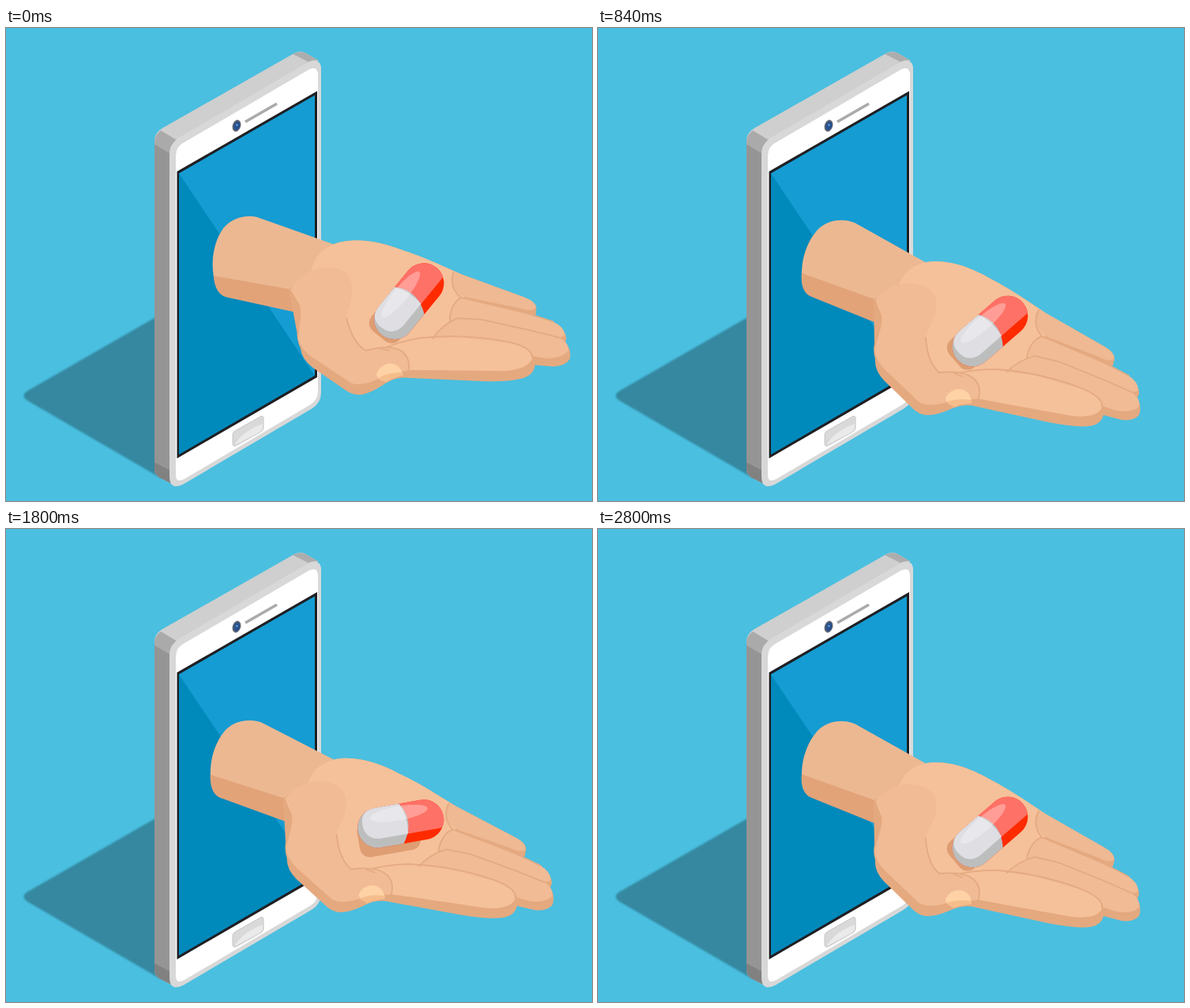
Write an HTML page that moves like this. It is 742 px wide and 600 px high and loops after 3 s.

```html
<!DOCTYPE html>
<html lang="en">
<head>
<meta charset="utf-8">
<title>Hand with capsule</title>
<style>
  html, body { margin: 0; width: 100%; height: 100%; overflow: hidden; background: #4abfe0; }
  svg { display: block; width: 742px; height: 600px; }
  .line { fill: none; stroke: #e4aa82; stroke-width: 1.8; stroke-linecap: round; }
  .skin { fill: #f5c19a; }
  .tone { fill: #f0bb95; }
  .dark { fill: #e5a97f; }
</style>
</head>
<body>
<svg viewBox="0 0 742 600">
  <defs>
    <clipPath id="pillClip"><rect x="-55" y="-25.5" width="110" height="51" rx="25.5"/></clipPath>
    <filter id="soft"><feGaussianBlur stdDeviation="1"/></filter>
  </defs>
  <rect width="742" height="600" fill="#4abfe0"/>
  <path d="M198 362 L26 461 Q19 466 26 472 L198 572Z" fill="#3488a0" filter="url(#soft)"/>

  <g id="phone">
    <path d="M188 143 Q188 133 198 127 L365 32 Q373 28 380 32 L395 41 L300 300 L215 581 L196 571 Q188 567 188 560Z" fill="#cfcfcf"/>
    <path d="M188 147 L207 158 V577 L196 571 Q188 567 188 560Z" fill="#959595"/>
    <path d="M188 147 Q187 137 196 130 L216 142 Q207 149 207 159Z" fill="#aaa"/>
    <path d="M188 551 L207 561 Q207 574 214 580 L196 571 Q188 567 188 560Z" fill="#818181"/>
    <path d="M363 33 Q373 28 380 32 L397 42 Q390 39 383 43Z" fill="#adadad"/>
    <path d="M207 161 Q207 147 219 139 L380 45 Q399 36 399 52 V462 Q399 476 387 483 L224 579 Q207 587 207 568Z" fill="#d8d8d8"/>
    <path d="M215 163 Q215 151 224 146 L383 53 Q395 47 395 60 V460 Q395 472 385 478 L226 572 Q215 578 215 567Z" fill="#fff"/>
    <path d="M216.5 182 L394 80 V443 L216.5 546Z" fill="#1f1f23"/>
    <path d="M219 184.5 L391 85.5 V441 L219 541Z" fill="#0089bb"/>
    <path d="M219 184.5 L391 85.5 V441Z" fill="#159cd2"/>
    <path d="M303 119 L343 96" stroke="#aaa" stroke-width="3.6"/>
    <g transform="rotate(18 292 124)">
      <ellipse cx="292" cy="124" rx="5.2" ry="7.6" fill="#5e6472"/>
      <ellipse cx="292.3" cy="124" rx="3.7" ry="5.6" fill="#25508f"/>
      <circle cx="292" cy="123" r="1.3" fill="#6f9ad0"/>
    </g>
    <path d="M290 511 L322 493 Q326 491 326 495 V507 Q326 510 323 512 L291 530 Q287 531 287 527 V516 Q287 513 290 511Z" fill="#d9d9d9" stroke="#c6c6c6"/>
    <path d="M290 529 Q297 513 325 502 V507 Q325 510 322 512Z" fill="#eaeaea"/>
  </g>

  <g id="hand">
    <path d="M258 309 L352 343 V374 L273 342 Q255 337 258 309Z" fill="#e2a379"/>
    <path d="M258 311 C258 286 269 264 281 253 C293 243 311 241 325 247 L416 298 L400 360 L350 344Z" fill="#ecb892"/>
    <path class="dark" d="M380 328 C388 306 402 298 424 296 C452 295 478 307 497 318 Q518 329 536 341 L566 361 L641 404 Q655 412 654 420 L652 428 Q648 431 644 430
      L677 447 Q686 456 685 464 L683 469 Q689 480 685 491 Q678 499 663 497 L640 491 Q637 503 622 505 Q605 507 570 500
      L474 479 Q462 477 450 482 Q428 492 416 491 Q406 490 399 483 L362 447 Q350 434 351 420 Q348 410 350 400 L349 344Z"/>
    <path class="skin" d="M352 346 Q366 337 380 328 C388 306 402 298 424 296 C452 295 478 307 497 318 Q518 329 536 341 L566 361 L566 395 L600 430
      L628 464 Q642 474 637 484 Q628 495 600 492 L480 470 L430 465 L380 420Z"/>
    <path class="tone" d="M518 436 L545 417 L575 423 L640 446 L676 462 Q687 470 685 480 Q676 489 655 485 L640 480 Q638 470 615 459 L550 440Z"/>
    <path class="tone" d="M543 418 Q548 396 562 391 L642 426 L672 441 Q684 449 684 459 Q680 464 668 459 L580 424Z"/>
    <path d="M554 368 Q554 359 559 357 L566 361 L641 404 Q655 412 653 420 Q646 424 634 417 L577 395 Q553 387 554 368Z" fill="#eeb993"/>
    <path class="line" d="M558 358 Q549 376 562 391 L642 425 L672 441 M562 391 Q547 397 543 418 M518 436 Q533 421 553 416 L583 423 L640 446 L676 462
      M444 440 Q480 432 505 433 Q560 437 610 456 Q640 468 638 480"/>
    <path class="tone" d="M351 345 Q368 324 395 324 C421 325 431 339 428 358 C425 376 415 382 415 397 Q418 425 432 437
      Q460 433 474 443 Q485 451 483 464 L479 471 Q460 469 441 475 Q420 481 407 475 L364 434 Q352 423 350 408 C355 389 361 377 359 363 Q357 350 351 345Z"/>
    <path class="line" d="M415 393 Q417 424 432 437 Q463 434 475 444 Q487 454 481 472 M451 438 L461 442"/>
    <path d="M440 469 Q446 458 458 458 Q472 460 473 475 Q457 475 448 479 Q440 475 440 469Z" fill="#fed2a4"/>
    <path d="M442 474 Q456 469 473 472 V476 Q459 477 450 481Z" fill="#f6bd8c"/>
    <rect id="shade" x="-39" y="-23" width="78" height="46" rx="13" fill="#de9d72"/>
    <g id="pill">
      <g clip-path="url(#pillClip)">
        <rect x="-56" y="-26" width="112" height="52" fill="#ff2b00"/>
        <rect x="-20" y="-40" width="90" height="54" rx="20" fill="#fe7166"/>
        <path d="M-56 -26 H2 Q19 0 -1 26 H-56Z" fill="#bcbebe"/>
        <path d="M2 -26 Q11 -7 7 14 H-28 Q-48 13 -48 -8 Q-47 -26 -28 -26Z" fill="#dedee3"/>
        <ellipse cx="0" cy="-13.5" rx="37" ry="9" fill="#fff" opacity=".31"/>
      </g>
    </g>
  </g>
</svg>
<script>
  const LOOP = 3000, STEP = 40;
  const hand = document.getElementById('hand');
  const pill = document.getElementById('pill');
  const shade = document.getElementById('shade');

  const ease = {
    sine: p => (1 - Math.cos(Math.PI * p)) / 2,
    out: p => p * (2 - p),
    in: p => p * p,
    line: p => p
  };

  // time, wrist angle
  const wrist = [
    [0, -9.7], [160, 13.2], [340, -9.7], [400, 0], [1480, 0], [1620, 8], [1720, -9.7],
    [1800, -2], [2120, -0.9], [2300, -2.2], [2500, 0], [3000, 0]
  ];

  // time since release, x, y, turn, easing towards this step
  const toss = [
    [-40, 0, 0, 0], [0, 0, -3, 33, 'line'], [170, -5, -135, 196, 'out'],
    [320, -9, -57, 340, 'in'], [360, 0, 0, 360, 'line']
  ];
  const releases = [400, 1800];

  function sample(keys, t, fallback) {
    const last = keys.length - 1;
    if (t <= keys[0][0]) return keys[0].slice(1);
    if (t >= keys[last][0]) return keys[last].slice(1);
    const i = keys.findIndex(k => k[0] > t);
    const a = keys[i - 1], b = keys[i];
    const p = (t - a[0]) / (b[0] - a[0]);
    const q = ease[b[4] || fallback](p);
    return [1, 2, 3].map(n => a[n] + (b[n] - a[n]) * (n === 3 ? p : q));
  }

  function draw(now) {
    const t = Math.floor(now % LOOP / STEP) * STEP;
    const [angle] = sample(wrist, t, 'sine');
    const start = t < 1480 ? releases[0] : releases[1];
    const [x, y, turn] = sample(toss, t - start, 'line');
    const tilt = turn - 41;
    hand.setAttribute('transform', `rotate(${angle} 280 284)`);
    pill.setAttribute('transform', `translate(${496.5 + x} ${384.5 + y}) rotate(${tilt})`);
    shade.setAttribute('transform', `translate(481 396) rotate(${tilt})`);
  }

  const begin = performance.now();
  function tick() {
    draw(performance.now() - begin);
    requestAnimationFrame(tick);
  }
  draw(0);
  requestAnimationFrame(tick);
</script>
</body>
</html>
```
